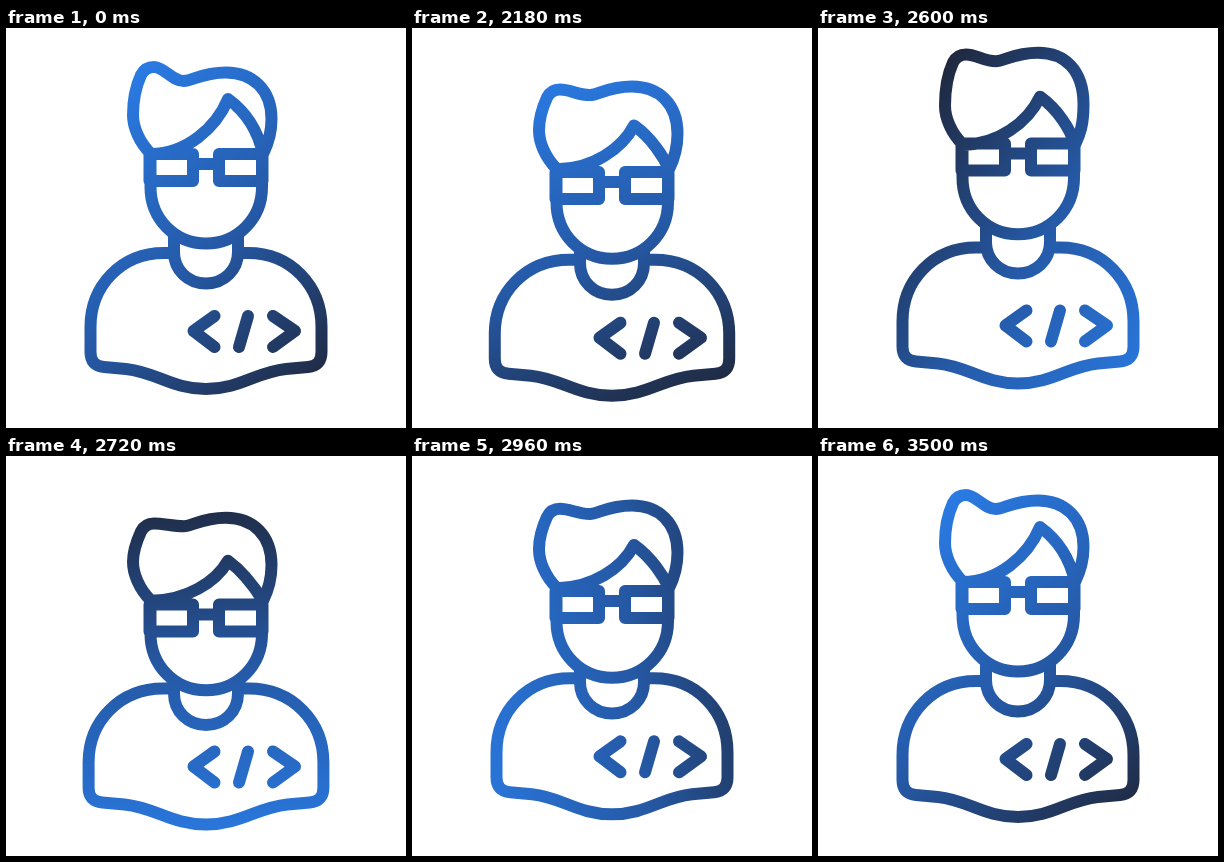
An HTML page that plays this animation: 400x400 px, repeating every 3.53 s.

```html
<!DOCTYPE html>
<html lang="en">
<head>
<meta charset="utf-8">
<title>Developer icon</title>
<style>
  html, body { margin: 0; width: 100%; height: 100%; overflow: hidden; background: #fff; }
  svg { display: block; width: 100%; height: 100%; }
</style>
</head>
<body>
<svg viewBox="0 0 400 400">
  <defs>
    <linearGradient id="ink" gradientUnits="userSpaceOnUse">
      <stop offset="0" stop-color="#2a7ce6"/>
      <stop offset=".5" stop-color="#2559a6"/>
      <stop offset="1" stop-color="#1f2333"/>
    </linearGradient>
  </defs>
  <path id="figure" fill="none" stroke="url(#ink)" stroke-width="12" stroke-linecap="round" stroke-linejoin="round"/>
</svg>
<script>
const LOOP = 3530, HOLD = 2030, STEP = 30, STEPS = 50;
const ink = document.getElementById('ink');
const figure = document.getElementById('figure');

// Turning points as [step, pixels]: the whole body hops, the head sinks or stretches
const hop = [[0, 0], [3, 10], [16, -14], [26, 10], [34, -5], [42, 2], [50, 0]];
const sink = [[0, 0], [5, 12], [13, -5], [16, -8], [20, -5], [26, 22], [40, -4], [50, 0]];

// How far each part follows the sinking head, and how it reacts to a stretch
const parts = {
  collar: [0.4, -0.5],
  chin: [0.75, 0],
  eyes: [1, 0],
  tip: [1.4, 0],
  crown: [0.65, -2.2],
  fringe: [1.75, 2.4]
};

const smooth = u => u * u * (3 - 2 * u);

function swing(points, x) {
  let i = 1;
  while (i < points.length - 1 && x > points[i][0]) i++;
  const [x0, y0] = points[i - 1], [x1, y1] = points[i];
  return y0 + (y1 - y0) * smooth((x - x0) / (x1 - x0));
}

// Moves the coordinates of a path: x is stretched about the middle, y shifted
function place(d, dy, stretch = 1) {
  let n = 0;
  return d.replace(/[\d.]+/g, v =>
    n++ % 2 ? +v + dy : 200 + (v - 200) * stretch);
}

const shirt = 'M164 225L158 225C115 225 84.5 258 84.5 299L84.5 324Q84.5 338 98 339L120 341' +
  'C150 344 166 361 200 361C234 361 250 344 280 341L302 339Q315.5 338 315.5 324' +
  'L315.5 299C315.5 258 285 225 242 225L236 225';
const code = 'M208.5 288L187.5 303L208.5 319M242 288L233 319M267 288L289 303L267 319';
const glasses = 'M143.5 126L187 126L187 153L143.5 153ZM213 126L256.5 126L256.5 153L213 153Z' +
  'M187 136L213 136';

function outline(p) {
  const { body, collar: c, chin: j, eyes: e, tip: t, crown: k, fringe: f } = p;
  const neck = `M168 ${209 + j}V${224 + c}C168 ${242 + c} 182 ${255.5 + c} 200 ${255.5 + c}` +
    `C218 ${255.5 + c} 232 ${242 + c} 232 ${224 + c}V${209 + j}`;
  const face = `M144.5 ${130 + e}V${159 + j}C144.5 ${191 + j} 169 ${215.5 + j} 200 ${215.5 + j}` +
    `C231 ${215.5 + j} 256 ${191 + j} 256 ${159 + j}V${130 + e}`;
  const hair = `M145 ${126 + j}C133 ${114 + j} 127 ${99 + j} 127 ${87 + j}` +
    `C127 ${72 + (j + t) / 2} 130 ${58 + t} 135 ${47 + t}` +
    `C138 ${41 + t} 142 ${39 + t} 148 ${39 + t}` +
    `C158 ${39 + t} 166 ${53 + k} 178 ${53 + k}` +
    `C186 ${53 + k} 196 ${44.5 + k} 220 ${44.5 + k}` +
    `C247 ${44.5 + k} 265.5 ${62 + k} 265.5 ${91 + (j + k) / 2}` +
    `C265.5 ${106 + j} 262 ${116 + j} 257 ${126 + j}`;
  const bangs = `M145 ${126 + j}C180 ${126 + j} 210 ${100 + (j + f) / 2} 222 ${71 + f}` +
    `C240 ${84 + f} 252 ${103 + f} 257 ${126 + j}`;
  const wide = 1 + Math.max(0, body) * 0.0022;
  return place(shirt, body, wide) + place(code, body) + neck + face + hair + bangs + place(glasses, e);
}

// One clockwise turn of the light, fastest a little before the middle
function shade(u) {
  const a = (320 + 360 * smooth(u + 0.75 * u * u * (1 - u))) * Math.PI / 180;
  const dx = 195 * Math.sin(a), dy = -195 * Math.cos(a);
  const ends = { x1: 218 + dx, y1: 212 + dy, x2: 218 - dx, y2: 212 - dy };
  for (const name in ends) ink.setAttribute(name, ends[name]);
}

function draw(ms) {
  const t = ms % LOOP;
  const step = t < HOLD ? 0 : Math.floor((t - HOLD) / STEP) + 1;
  const body = swing(hop, step), low = swing(sink, step);
  const pose = { body };
  for (const name in parts) {
    const [follow, stretch] = parts[name];
    pose[name] = body + follow * low + stretch * Math.max(0, -low);
  }
  figure.setAttribute('d', outline(pose));
  shade(step / STEPS);
}

const start = performance.now();
function tick() {
  draw(performance.now() - start);
  requestAnimationFrame(tick);
}
tick();
</script>
</body>
</html>
```
